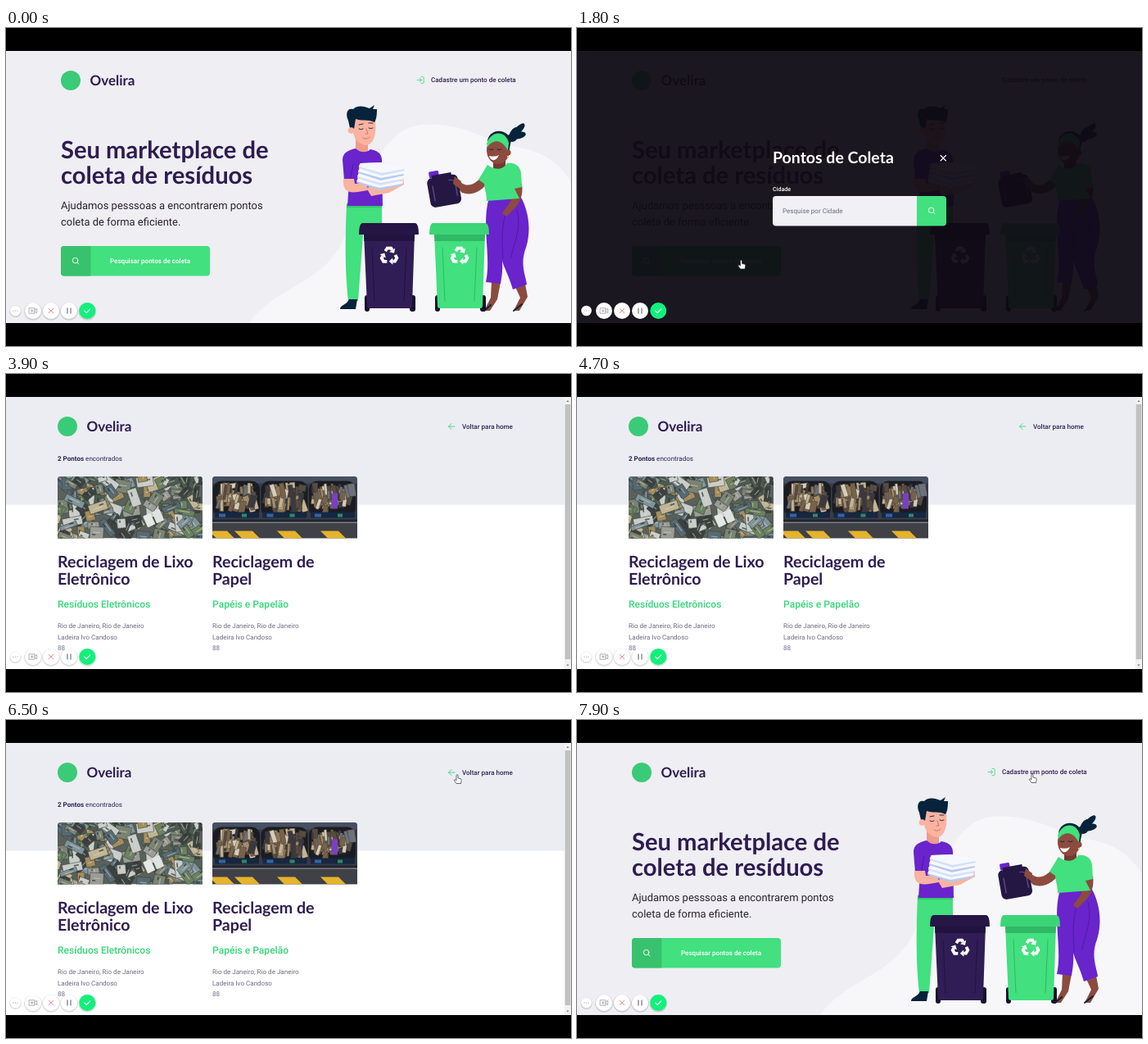
An HTML page for the animation above (8 s loop, 690 px wide and 388 px high).

```html
<!DOCTYPE html>
<html lang="pt-BR">
<head>
<meta charset="utf-8">
<title>Pontos de coleta</title>
<style>
  html, body { margin: 0; width: 100%; height: 100%; overflow: hidden; background: #000; }
  svg { display: block; width: 690px; height: 388px; }
  text { font-family: Roboto, Arial, sans-serif; font-size: 8.06px; fill: #322153; text-rendering: geometricPrecision; }
  .head { font-family: Lato, "Open Sans", sans-serif; font-weight: 700; fill: #2e1c50; }
  .mid { font-weight: 500; }
  .grey { fill: #6c6c80; }
  .line { fill: none; stroke-linecap: round; stroke-linejoin: round; }
</style>
</head>
<body>
<svg id="stage" viewBox="0 0 690 388" xmlns="http://www.w3.org/2000/svg"></svg>
<script>
const LOOP = 8000, STEP = 100;
const GREEN = '#42e07e', PURPLE = '#6924cc', NAVY = '#07233b', PAGE = '#eeeef3';
const PEACH = '#f9b3a0', BROWN = '#8c4b3e';

const rect = (x, y, w, h, fill, more = '') =>
  `<rect x="${x}" y="${y}" width="${w}" height="${h}" fill="${fill}" ${more}/>`;
const disc = (x, y, r, fill, more = '') => `<circle cx="${x}" cy="${y}" r="${r}" fill="${fill}" ${more}/>`;
const shape = (d, fill, more = '') => `<path d="${d}" fill="${fill}" ${more}/>`;
const line = (d, color, w = 1) => `<path class="line" d="${d}" stroke="${color}" stroke-width="${w}"/>`;
const label = (x, y, str, cls = '', more = '') => `<text x="${x}" y="${y}" class="${cls}" ${more}>${str}</text>`;
const size = px => `style="font-size:${px}px"`;
const group = (id, body, more = '') => `<g id="${id}" ${more}>${body}</g>`;

function randomizer(seed) {
  return () => (seed = (seed * 16807) % 2147483647) / 2147483647;
}

const lens = (x, y) => line(`M${x + 2.2} ${y + 2.2}l1.8 1.8`, '#fff', .9) +
  `<circle class="line" cx="${x - .4}" cy="${y - .4}" r="3.3" stroke="#fff" stroke-width=".9"/>`;

const brand = x => disc(x + 12, 64, 12, '#3acb78') + label(x + 35.5, 69.5, 'Ovelira', 'head', size(17));

function recycle(x, y) {
  const arrow = '<path d="M-4.7-5.8L-2.4-9.4H2.2L3.6-7" fill="none" stroke="#fff" stroke-width="3.8"/>' +
    shape('M7.2-9.2L0-4.8L6-3.2Z', '#fff');
  return `<g transform="translate(${x} ${y})">` +
    [0, 120, 240].map(a => `<g transform="rotate(${a})">${arrow}</g>`).join('') + '</g>';
}

function bin(x, body, edge, lid) {
  return rect(x + 7, 326, 6, 20, '#15102a', 'rx="3"') + rect(x + 62, 326, 7, 20, '#15102a', 'rx="3"') +
    shape(`M${x + 6} 250H${x + 68}L${x + 65} 339Q${x + 65} 342 ${x + 62} 342H${x + 13}Q${x + 10} 342 ${x + 10} 339Z`, body) +
    shape(`M${x + 6} 251H${x + 68}L${x + 67.6} 260H${x + 6.4}Z`, edge) +
    line(`M${x + 16} 268L${x + 19} 333M${x + 58} 268L${x + 55} 333`, edge, 1) +
    shape(`M${x + 4} 238H${x + 69}Q${x + 73} 239 ${x + 73} 252H${x}Q${x} 239 ${x + 4} 238Z`, lid) +
    recycle(x + 37, 278);
}

function man() {
  let s = shape('M416 214H459V240H437L430 333H418C414 300 414 260 416 214Z', GREEN) +
    shape('M416 214H459V219H416Z', '#33c46b') +
    shape('M419 331H429L427 343H408C408 338 416 338 419 331Z', NAVY) +
    shape('M427 132H442V152H427Z', '#ee9c8b') +
    shape('M422 108H450C453 122 451 135 446 140C440 146 433 142 428 137C424 132 422 122 422 108Z', PEACH) +
    shape('M418 113C414 104 417 97 424 99C430 93 438 96 444 98L450 94L448 99L453 99C453 107 452 112 450 115C442 111 434 114 427 111L425 123L420 122Z', NAVY) +
    disc(421.5, 125, 3.8, PEACH) +
    line('M431 123q2.5 1.8 5 0M443 122q2.5 1.8 5 0M431 118l5-1M443 116l5 0', NAVY, .9) +
    line('M440 123l2 6h-3M436 134q4 3 8-1', '#c9695e', .8) +
    shape('M427 147C417 149 411 153 411 161L413 186H419L417 217H460L459 166C460 156 457 150 445 148C440 153 432 152 427 147Z', PURPLE) +
    line('M420 187L424 166', '#4f18a2') +
    shape('M412 184C411 197 416 202 430 200L442 198L440 190L426 190L425 184Z', PEACH) +
    shape('M440 195L470 188L485 181L486 191L468 201L446 205Z', PEACH);
  for (let i = 0; i < 4; i++) {
    const y = 189 - i * 6, x = 428 + i * .9;
    s += shape(`M${x} ${y}l28 9l28-6v-5l-27-5l-27 1z`, i % 2 ? '#d5e0f6' : '#b8c9ec') +
      shape(`M${x} ${y - 2}l28 8l28-5l1-3l-28-5l-27 1z`, '#f5f8ff');
  }
  return s;
}

function woman() {
  const tufts = [[620, 128, 8, 4, -55], [626, 124, 10, 4, -45], [627, 131, 8, 4, -15], [618, 134, 6, 5, 0]]
    .map(([x, y, a, b, r]) => `<ellipse rx="${a}" ry="${b}" transform="translate(${x} ${y}) rotate(${r})" fill="${NAVY}"/>`).join('');
  return tufts +
    shape('M593 309L604 310L600 331L591 345H584L592 329Z', BROWN) +
    shape('M622 316L634 312L637 328L627 345H620L628 329Z', BROWN) +
    line('M584 345L592 338M620 345L630 337', NAVY, 2) +
    shape('M590 207L628 205C638 222 642 246 635 268C627 288 635 303 636 313L619 319C614 302 608 292 606 284C607 296 605 305 604 312L586 310C593 280 580 240 590 207Z', PURPLE) +
    line('M612 222C604 242 606 262 607 282M624 222C630 244 620 262 617 280', '#4f18a2', .9) +
    shape('M595 160H610V172Q602 177 595 171Z', '#733a30') +
    `<ellipse cx="601" cy="149" rx="14" ry="17" fill="${BROWN}"/>` +
    shape('M588 138C590 123 611 121 617 137L614 151C608 137 598 134 588 144Z', NAVY) +
    shape('M587 141C592 125 610 124 614 140L613 150C607 137 596 134 588 145Z', GREEN) +
    disc(613, 152, 3.6, BROWN) + disc(613, 157, 1.2, '#f2c94c') +
    line('M590 148q2.5 1.6 5 0M600 148q2.5 1.6 5 0', NAVY, .9) +
    shape('M590 156Q597 158 602 155Q599 162 594 161Q591 160 590 156Z', '#fff') +
    shape('M586 175C577 188 567 195 558 190L547 183L545 189L557 201C572 206 583 197 592 184Z', BROWN) +
    shape('M620 190H630C632 203 628 213 621 220L611 230L606 226L616 212Z', BROWN) +
    shape('M588 167C600 175 607 172 612 165C622 164 628 169 629 177L630 194L621 196L627 208L587 211C587 201 584 196 584 190L577 185Z', GREEN) +
    `<g transform="rotate(-10 534 198)">` +
    rect(516, 181, 38, 36, '#251744', 'rx="6"') + rect(520, 173, 12, 8, PURPLE, 'rx="1.5"') +
    rect(523, 178, 24, 6, '#251744') + line('M522 191V209M543 187Q550 187 550 193V207', '#5a4a80', 1.4) +
    '</g>' + shape('M548 181L556 187L554 196L546 190Z', BROWN);
}

function home() {
  return rect(0, 28, 690, 332, PAGE) +
    shape('M297 360C325 318 386 312 410 262C432 214 452 122 508 118C560 114 582 138 628 146C660 152 678 168 690 188V360Z', '#f7f7fa') +
    brand(67) +
    line('M507 59.5h2.2q1 0 1 1v6q0 1-1 1H507M502 63.5h5.5M505.3 61.2l2.3 2.3l-2.3 2.3', GREEN, .9) +
    label(519, 66.3, 'Cadastre um ponto de coleta', 'mid') +
    label(67, 159, 'Seu marketplace de', 'head', size(29.2)) +
    label(67, 190, 'coleta de resíduos', 'head', size(29.2)) +
    label(67, 221, 'Ajudamos pesssoas a encontrarem pontos', '', 'style="font-size:12.95px;fill:#29222f"') +
    label(67, 240.5, 'coleta de forma eficiente.', '', 'style="font-size:12.95px;fill:#29222f"') +
    rect(67, 266, 182, 36.5, GREEN, 'rx="4"') +
    shape('M71 266H103.5V302.5H71Q67 302.5 67 298.5V270Q67 266 71 266Z', '#38c26d') +
    rect(67, 266, 182, 36.5, '#1f9a54', 'rx="4" id="hover"') +
    lens(85, 284) +
    label(127, 287, 'Pesquisar pontos de coleta', 'mid', 'style="fill:#fff"') +
    man() + woman() +
    bin(431, '#301d55', '#21123f', '#251646') + bin(517, GREEN, '#30b965', '#3cd576');
}

function modal() {
  return rect(0, 28, 690, 332, '#0e0a14', 'opacity=".94"') +
    label(239, 164.5, 'Pontos de Coleta', 'head', 'style="font-size:19.5px;fill:#fff"') +
    line('M444 155.5l6.5 6.5M450.5 155.5l-6.5 6.5', '#fff', 1.1) +
    label(239, 199, 'Cidade', 'mid', 'style="font-size:7.06px;fill:#fff"') +
    shape('M243 205H415V241.5H243Q239 241.5 239 237.5V209Q239 205 243 205Z', '#f0f0f5') +
    shape('M415 205H447Q451 205 451 209V237.5Q451 241.5 447 241.5H415Z', GREEN) +
    lens(433, 222.7) +
    group('focus', '<rect x="238" y="204" width="177.5" height="38.5" rx="2.5" fill="none" stroke="#fff"/>' +
      '<rect x="239" y="205" width="175.5" height="36.5" rx="2" fill="none" stroke="#101010"/>') +
    label(251, 225.8, '', 'grey', 'id="query"') +
    rect(0, 218, .7, 9, '#55556a', 'id="caret"');
}

function boardPhoto(x, y) {
  const rnd = randomizer(41);
  const tones = ['#7b8474', '#9a9c95', '#4c5a52', '#c0b595', '#7f949a', '#3b4240', '#c9cdc9', '#6b8260', '#a58d5c', '#566a74'];
  let s = rect(x, y, 177, 76, '#59615a');
  for (let i = 0; i < 150; i++) {
    const w = 8 + rnd() * 17, h = 5 + rnd() * 11;
    const px = x + rnd() * 177, py = y + rnd() * 76, turn = rnd() * 180;
    s += `<g transform="translate(${px.toFixed(1)} ${py.toFixed(1)}) rotate(${turn.toFixed()})">` +
      rect(-w / 2, -h / 2, w, h, tones[Math.floor(rnd() * tones.length)], 'stroke="#343b38" stroke-width=".5"') +
      rect(-w / 4, -1.5, w / 2, 1, '#ded9c4', 'opacity=".6"') +
      rect(-w / 3, 1, w / 4, 1.6, '#2c3330', 'opacity=".7"') + '</g>';
  }
  return s + `<g transform="rotate(-24 ${x + 117} ${y + 51})">` +
    rect(x + 106, y + 44, 10, 15, '#e6e8e6', 'rx="1"') + rect(x + 118, y + 44, 10, 15, '#dfe2e0', 'rx="1"') + '</g>';
}

function paperPhoto(x, y) {
  const rnd = randomizer(977);
  const tones = ['#a48c69', '#c5b593', '#77624a', '#d6cdb9', '#574c44', '#8f7858', '#6d727a', '#3a3940'];
  let s = rect(x, y, 177, 76, '#363c48') + rect(x, y, 177, 9, '#465061') + rect(x, y + 54, 177, 22, '#3f4147');
  for (let b = 0; b < 3; b++) {
    const bx = x + 4 + b * 58.5;
    s += rect(bx - 3, y + 6, 57, 44, '#1b1c22', 'rx="10"');
    for (let i = 0; i < 60; i++) {
      const w = 2 + rnd() * 7, h = 6 + rnd() * 13;
      const px = bx + rnd() * 44, py = y + 8 + rnd() * 24;
      s += rect(px.toFixed(1), py.toFixed(1), w.toFixed(1), h.toFixed(1), tones[Math.floor(rnd() * tones.length)],
        `stroke="#3f372f" stroke-width=".4" transform="rotate(${(rnd() * 40 - 20).toFixed()} ${px.toFixed(1)} ${py.toFixed(1)})"`);
    }
    s += rect(bx - 1, y + 44, 54, 7, '#17273f') + rect(bx + 4, y + 46, 8, 4, '#2d66a8') + rect(bx + 32, y + 46, 6, 4, '#2e8a68');
  }
  s += rect(x + 146, y + 21, 7, 19, '#7b3fc0') + rect(x, y + 53, 177, 3, '#20242d') + rect(x, y + 56, 177, 1.5, '#777b82');
  for (const dx of [-4, 27, 79, 132]) s += shape(`M${x + dx} ${y + 67}h22l9 9h-22z`, '#e5b32c');
  return s;
}

function card(x, photo, title, kind) {
  const clip = 'clip' + x;
  return `<clipPath id="${clip}"><path d="M${x} 200.5V129q0-4 4-4h169q4 0 4 4v71.5z"/></clipPath>` +
    `<g clip-path="url(#${clip})">${photo(x, 124.5)}</g>` +
    title.map((row, i) => label(x, 236 + i * 20.7, row, 'head', size(19.6))).join('') +
    label(x, 285, kind, 'mid', 'style="font-size:12.05px;fill:#34d678"') +
    ['Rio de Janeiro, Rio de Janeiro', 'Ladeira Ivo Candoso', '88']
      .map((row, i) => label(x, 310.4 + i * 13.1, row, 'grey')).join('');
}

function results() {
  return rect(0, 28, 690, 332, '#fff') + rect(0, 28, 682, 131.5, '#ecedf2') +
    brand(63) +
    line('M548 64H540.5M544 60.5L540.5 64L544 67.5', GREEN, 1) +
    label(557, 66.6, 'Voltar para home', 'mid') +
    label(63, 106.4, '<tspan font-weight="700">2 Pontos</tspan> encontrados') +
    card(63, boardPhoto, ['Reciclagem de Lixo', 'Eletrônico'], 'Resíduos Eletrônicos') +
    card(252, paperPhoto, ['Reciclagem de', 'Papel'], 'Papéis e Papelão') +
    rect(682, 28, 8, 332, '#f1f1f1') + rect(682.7, 37, 6.6, 311, '#c1c1c1') +
    shape('M684.4 34h3.2l-1.6-2zM684.4 354.5h3.2l-1.6 2z', '#777');
}

function toolbar() {
  const y = 345, grey = '#8d8f97';
  const button = (x, r, fill) => disc(x, y + .8, r + .9, '#000', 'opacity=".13"') + disc(x, y, r, fill);
  return button(11.5, 6.3, '#fff') + [9.1, 11.5, 13.9].map(x => disc(x, y, .6, grey)).join('') +
    button(33, 10, '#fff') + line('M28.5 341.8h6.5v6.4h-6.5zM35 344l2.7-1.6v5.2l-2.7-1.6M30.4 345h2.8M31.8 343.6v2.8', grey, .7) +
    button(55, 10, '#fff') + line('M52.2 342.2l5.6 5.6M57.8 342.2l-5.6 5.6', '#f08a95', 1) +
    button(77, 10, '#fff') + line('M75 342v6M79 342v6', grey, 1.5) +
    button(99.3, 10, '#12f07c') + line('M95.8 345.2l2.4 2.3l4.6-4.6', '#fff', 1.1);
}

const POINTERS = {
  arrow: shape('M0 0V10.5L2.5 8.3L4.1 12L5.7 11.3L4.1 7.7H7.5Z', '#fff', 'stroke="#222" stroke-width=".7"'),
  hand: shape('M-1 .8Q0-.5 1 .8V4.5L4.2 5.2Q5.4 5.6 5.2 7L4.5 11H-1L-3.6 7.3Q-3.6 5.8-2.2 6.3L-1 7.3Z', '#fff', 'stroke="#333" stroke-width=".7"'),
  beam: line('M-1.5 0h3M-1.5 9h3M0 0v9', '#222', .8)
};

document.getElementById('stage').innerHTML =
  group('home', home()) + group('modal', modal()) + group('results', results()) + toolbar() +
  Object.entries(POINTERS).map(([id, body]) => group(id, body)).join('');

// time, x, y, pointer from then on
const PATH = [
  [0, 690, 318, ''], [100, 682, 317, 'arrow'], [200, 590, 150, 'arrow'], [400, 602, 70, 'arrow'],
  [600, 500, 150, 'arrow'], [800, 340, 270, 'arrow'], [1000, 246, 296, 'hand'], [1200, 212, 288, 'hand'],
  [1500, 200.5, 283, 'hand'], [2000, 200.5, 283, 'hand'], [2100, 240, 250, 'arrow'], [2200, 300, 219, 'beam'],
  [2400, 300, 219, ''], [5100, 136, 242, 'arrow'], [5500, 300, 172, 'arrow'], [5900, 472, 112, 'arrow'],
  [6000, 480, 106, 'arrow'], [6300, 540, 74, 'hand'], [6500, 551, 66.5, 'hand'], [6800, 551, 66.5, 'hand'],
  [7000, 551, 68, 'arrow'], [7200, 548, 74, 'arrow'], [7600, 555, 67, 'hand'], [7900, 556, 65.5, 'hand']
];
const TYPED = [[0, 'Pesquise por Cidade'], [3000, 'R'], [3300, 'Ri'], [3500, 'Rio']];

const el = id => document.getElementById(id);
const show = (id, on) => el(id).setAttribute('display', on ? 'inline' : 'none');
const within = (t, a, b) => t >= a && t < b;
const lastBefore = (rows, t) => rows.reduce((best, row, i) => row[0] <= t ? i : best, 0);

function movePointer(t) {
  const i = lastBefore(PATH, t), [t0, x0, y0, kind] = PATH[i];
  const [t1, x1, y1] = PATH[i + 1] || [LOOP, x0, y0];
  const k = (t - t0) / (t1 - t0);
  for (const id in POINTERS) show(id, id === kind);
  if (kind) el(kind).setAttribute('transform', `translate(${x0 + (x1 - x0) * k} ${y0 + (y1 - y0) * k})`);
}

function draw(t) {
  const onResults = within(t, 3900, 6800);
  show('home', !onResults);
  show('results', onResults);
  show('modal', within(t, 1800, 3900));
  const hover = within(t, 1000, 3900) ? Math.min(1, (t - 900) / 300) : 0;
  el('hover').setAttribute('opacity', hover * .38);

  const query = el('query'), value = TYPED[lastBefore(TYPED, t)][1];
  query.textContent = value;
  show('focus', t >= 2400);
  show('caret', t >= 2400);
  el('caret').setAttribute('x', 251 + (t >= 3000 ? query.getComputedTextLength() + .8 : -.5));
  movePointer(t);
}

const start = performance.now();
let shown = -1;
function tick() {
  const t = Math.floor(((performance.now() - start) % LOOP) / STEP) * STEP;
  if (t !== shown) draw(shown = t);
  requestAnimationFrame(tick);
}
tick();
</script>
</body>
</html>
```
